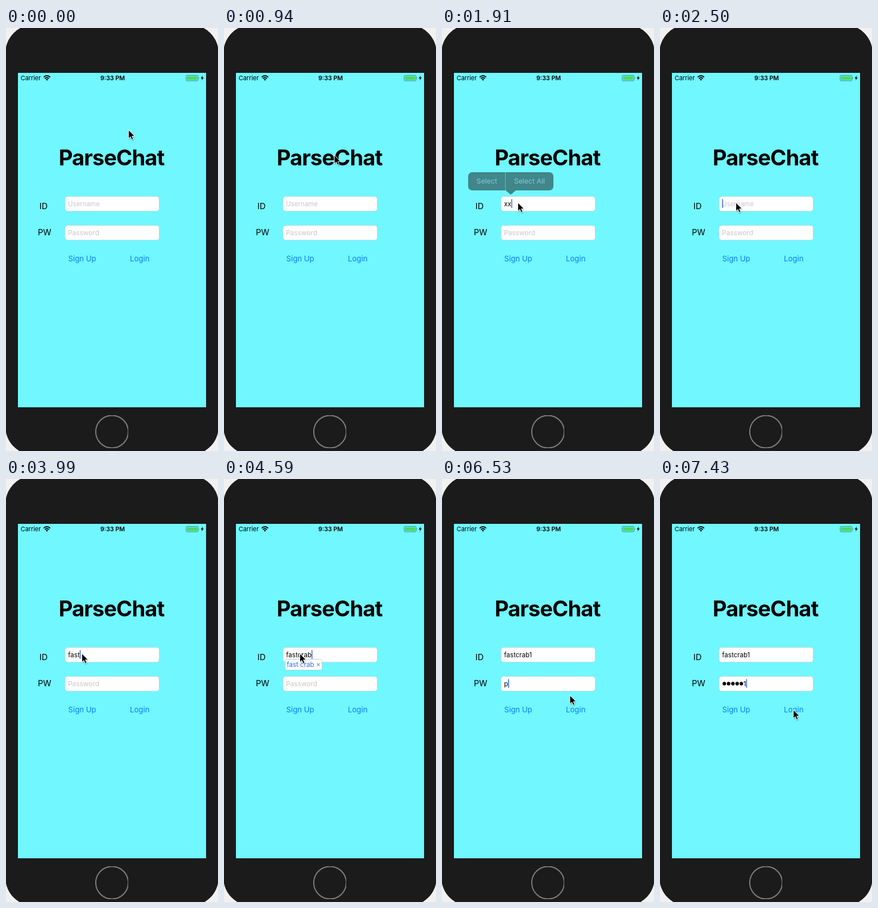
Write an HTML page that moves like this. It is 373 px wide and 745 px high and loops after 8 s.

```html
<!DOCTYPE html>
<html lang="en">
<head>
<meta charset="utf-8">
<title>Login screen</title>
<style>
  html, body { margin: 0; width: 100%; height: 100%; overflow: hidden; background: #f1f1f1; }
  svg { display: block; width: 100%; height: 100%; }
  text { font-family: Inter, "Liberation Sans", sans-serif; font-optical-sizing: none; white-space: pre; }
  .field { fill: #fff; stroke: #c3d3d6; stroke-width: .8; }
  .hint { fill: #c7c7cd; }
  .link { fill: #0a7cff; font-size: 13.2px; }
  .entry { font-size: 11.5px; }
  .label { font-size: 14.6px; text-anchor: middle; }
  .menu { font-size: 12.3px; }
</style>
</head>
<body>
<svg viewBox="0 0 373 745" preserveAspectRatio="none">
  <defs>
    <clipPath id="buttonClip"><rect x="157" y="682" width="58" height="58"/></clipPath>
    <filter id="soft" x="-50%" y="-50%" width="200%" height="200%"><feGaussianBlur stdDeviation=".9"/></filter>
  </defs>

  <rect width="373" height="745" fill="#f1f1f1"/>
  <rect x="-1" y="-6" width="375" height="758" rx="50" fill="#1b1b1b"/>
  <circle cx="186.5" cy="711" r="28.6" fill="none" stroke="#7d7d7d" stroke-width="2" clip-path="url(#buttonClip)"/>
  <rect x="21" y="79" width="331" height="589" fill="#70f7ff"/>

  <text x="25.8" y="92" font-size="11" letter-spacing="-.08">Carrier</text>
  <g fill="none" stroke="#000" stroke-width="1.9">
    <path d="M66.2 86.6Q72 81.6 77.8 86.6"/>
    <path d="M68.3 89.1Q72 85.9 75.7 89.1"/>
  </g>
  <path d="M69.9 90.5Q72 88.9 74.1 90.5L72 92.7Z"/>
  <text x="187.6" y="92" font-size="10.7" font-weight="600" text-anchor="middle">9:33 PM</text>
  <rect x="317" y="83.5" width="21" height="9.5" rx="2" fill="none" stroke="#3f898e" stroke-width="1"/>
  <rect x="318.4" y="84.9" width="18.2" height="6.7" rx=".8" fill="#4cd964"/>
  <path d="M339.2 86.6q1.5 1.6 0 3.3z" fill="#3f898e"/>
  <path d="M346.2 83.6L342.6 88.8H345L344.1 92.6L347.9 87.2H345.4Z"/>

  <text x="185.6" y="242" font-size="38.2" font-weight="700" letter-spacing="-.95" text-anchor="middle">ParseChat</text>
  <text class="label" x="66" y="318.8">ID</text>
  <text class="label" x="67.8" y="364.8">PW</text>

  <rect class="field" x="103.9" y="296.8" width="165.6" height="25.8" rx="4.4"/>
  <rect class="field" x="103.9" y="347.8" width="165.6" height="25.8" rx="4.4"/>
  <text id="idHint" class="hint" x="109" y="313.8" font-size="11.5">Username</text>
  <text id="pwHint" class="hint" x="109" y="364.8" font-size="11.9">Password</text>
  <text id="idText" class="entry" x="109.3" y="313.8"></text>
  <g id="dots"></g>
  <text id="pwText" class="entry" y="364.8"></text>
  <rect id="caret" width="1.6" height="15.4" fill="#426bf2"/>

  <text class="link" x="109.5" y="410.8">Sign Up</text>
  <text class="link" x="218" y="410.8">Login</text>

  <g id="menu">
    <path fill="#0d0d0d" d="M53 254H189a7 7 0 0 1 7 7V279a7 7 0 0 1 -7 7H130L121 293.5L112 286H53a7 7 0 0 1 -7 -7V261a7 7 0 0 1 7 -7Z"/>
    <path d="M111.5 254V286" stroke="#777" stroke-width="1"/>
    <g id="menuText">
      <text class="menu" x="60.8" y="274.3">Select</text>
      <text class="menu" x="126.8" y="274.3">Select All</text>
    </g>
  </g>

  <g id="bubble">
    <rect x="107.5" y="317.5" width="65" height="19" rx="3" fill="#fff" stroke="#b5c4c7" stroke-width=".8"/>
    <text class="entry" x="110.5" y="331" fill="#2f6fe0">fast crab</text>
    <path d="M163.5 324.5l5 5m0 -5l-5 5" stroke="#999" stroke-width="1.1"/>
  </g>

  <g id="pointer">
    <path d="M0 0V15.2L3.5 12L5.8 17.4L8.5 16.2L6.2 11H11Z" transform="translate(.6 1.6)" opacity=".4" filter="url(#soft)"/>
    <path d="M0 0V15.2L3.5 12L5.8 17.4L8.5 16.2L6.2 11H11Z" stroke="#fff" stroke-width="1" stroke-linejoin="round"/>
  </g>
</svg>
<script>
const LOOP = 8000, LEFT = 109.3, DOT = 7.5;
const NAME = 'fastcrab1', SECRET = 'pass01';
const el = id => document.getElementById(id);
const show = (node, on) => node.setAttribute('display', on ? 'inline' : 'none');

// Each row is a start time followed by the value held from then on.
const held = (rows, t) => rows.reduce((cur, row) => row[0] <= t ? row : cur).slice(1);

const POINTER = [
  [0, 215.5, 179.5], [730, 211, 188], [880, 194, 224], [1030, 166, 272],
  [1180, 147, 292], [1320, 140.5, 295.5], [1470, 135, 303], [1770, 133.5, 307.5],
  [5340, 130, 322], [5490, 122, 350], [5640, 119.5, 359],
  [5940, 170, 371], [6080, 225, 381], [7280, 229, 392], [7430, 234.5, 406.5]
];
const DRAFT = [[0, ''], [1180, 'x'], [1320, 'xx'], [2350, 'x'], [2500, '']];
const MENU = [[0, 0, 1], [1320, .13, .5], [1470, .85, 1], [1910, .48, .5], [2060, 0, 1]];
const CARET = [[0, 0], [1030, 1], [3100, .5], [3240, 0], [3540, 1], [5640, 0], [5790, 1]];
const KEYS = [6530, 6680, 6980, 7130, 7280, 7430];

const dots = [...SECRET].map((_, i) => {
  const c = document.createElementNS('http://www.w3.org/2000/svg', 'circle');
  c.setAttribute('cx', 113.2 + DOT * i);
  c.setAttribute('cy', 360.4);
  c.setAttribute('r', 3.1);
  return el('dots').appendChild(c);
});

function nameAt(t) {
  if (t < 3540) return held(DRAFT, t)[0];
  const count = t < 4890 ? Math.min(8, Math.floor((t - 3540) / 150) + 1) : 9;
  return NAME.slice(0, count);
}

function width(node) {
  return node.textContent ? node.getComputedTextLength() : 0;
}

function draw(t) {
  const name = nameAt(t);
  el('idText').textContent = name;
  show(el('idHint'), !name);

  const typed = KEYS.filter(k => k <= t).length;
  const hidden = Math.max(0, typed - 1);
  dots.forEach((dot, i) => show(dot, i < hidden));
  el('pwText').textContent = typed ? SECRET[typed - 1] : '';
  el('pwText').setAttribute('x', LEFT + DOT * hidden);
  show(el('pwHint'), !typed);

  const inSecret = t >= 5640;
  const end = inSecret ? DOT * hidden + width(el('pwText')) : width(el('idText'));
  el('caret').setAttribute('x', LEFT + end);
  el('caret').setAttribute('y', inSecret ? 352.4 : 301.4);
  el('caret').setAttribute('opacity', held(CARET, t)[0]);

  const [fade, ink] = held(MENU, t);
  el('menu').setAttribute('opacity', fade);
  el('menuText').setAttribute('fill', ink < 1 ? '#9a9a9a' : '#fff');
  show(el('bubble'), t >= 4590 && t < 4890);

  el('pointer').setAttribute('transform', `translate(${held(POINTER, t).join(' ')})`);
}

const start = performance.now();
function tick() {
  draw((performance.now() - start) % LOOP);
  requestAnimationFrame(tick);
}
tick();
</script>
</body>
</html>
```
